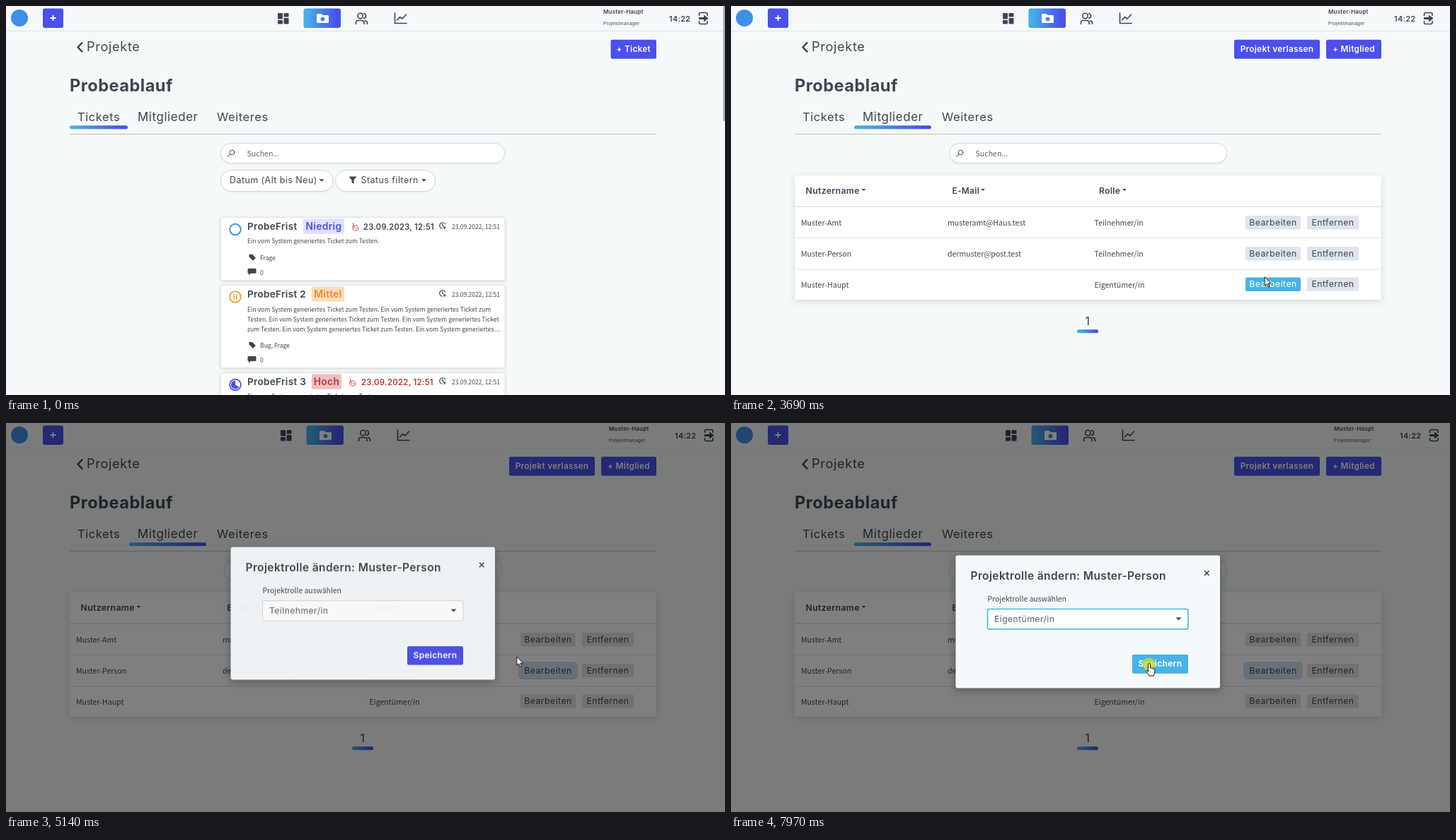
These frames come from a looping animation (1016 px wide and 551 px high, 8 s). An HTML page:

```html
<!DOCTYPE html>
<html lang="de">
<head>
<meta charset="utf-8">
<title>Projektrolle ändern</title>
<style>
html,body{margin:0;width:100%;height:100%;overflow:hidden;background:#f5f9fa}
svg{display:block;width:1016px;height:551px}
text{white-space:pre}
.m,.b{font-family:Inter,"Open Sans",sans-serif;font-weight:400;letter-spacing:.035em}
.b{font-weight:600;letter-spacing:.025em}
.h{font-weight:700;letter-spacing:.02em}
.s{font-family:"Noto Sans CJK JP","Noto Sans CJK SC","Noto Sans CJK",Lato,sans-serif}
.c{text-anchor:middle}
.card{fill:#fff;stroke:#dfe4e8;filter:drop-shadow(0 1px 2px #0002)}
.pill{fill:#fff;stroke:#cfd8dd;filter:drop-shadow(0 1px 1px #0001)}
.table{fill:#fff;filter:drop-shadow(0 2px 5px #0002)}
.box{filter:drop-shadow(0 3px 6px #0005)}
.line{fill:none;stroke:#3f4550;stroke-width:1.6;stroke-linecap:round;stroke-linejoin:round}
</style>
</head>
<body>
<svg id="stage" viewBox="0 0 1016 551" fill="#3f4550"></svg>
<script>
const LOOP = 8000, BLUE = '#4a50e8', SKY = '#47b3e8', GREY = '#dfe5eb';

// Keyframes written as [ms, css] stops
let css = '';
const keys = (name, stops) => {
  css += `@keyframes ${name}{${stops.map(([ms, rule]) => `${ms / LOOP * 100}%{${rule}}`).join('')}}`;
};
// Hidden at first, toggled at every edge
const toggle = (name, ...edges) =>
  keys(name, [[0, `opacity:${edges[0] ? 0 : 1}`], ...edges.filter(ms => ms).map(ms =>
    [ms, `opacity:${edges.indexOf(ms) % 2 ? 0 : 1}`])]);

toggle('tickets', 0, 1900);
toggle('tabHover', 1600);
toggle('status', 1820, 2480);
toggle('hover3', 3680, 4105);
toggle('hover2', 4105, 4880);
toggle('focus2', 4880);
toggle('selFocus', 5810);
toggle('selOpen', 5810, 6960);
toggle('list', 5910, 6960);
toggle('option2', 6190, 6960);
toggle('before', 0, 6960);
toggle('after', 6960);
toggle('saveHover', 7440);
toggle('arrow', 130, 1500, 2540, 5500, 7000, 7380);
toggle('hand', 1500, 2540, 5500, 7000, 7380);
toggle('click', 1820, 2000, 4710, 4890, 5810, 5980, 6825, 6970, 7965);
keys('members', [[0, 'opacity:0'], [1900, 'opacity:0'], [2150, 'opacity:1'], [LOOP, 'opacity:1']]);
keys('shiftMid', [[0, 'transform:none'], [4820, 'transform:translateX(4px)']]);
keys('shiftEnd', [[0, 'transform:none'], [4820, 'transform:translateX(8px)']]);
keys('dim', [[0, 'opacity:0'], [4820, 'opacity:0'], [4970, 'opacity:.5'], [LOOP, 'opacity:.5']]);
keys('fade', [[0, 'opacity:0'], [4968, 'opacity:0'], [5150, 'opacity:1'], [LOOP, 'opacity:1']]);
keys('drop', [[0, 'transform:translateY(-50px)'],
  [4968, 'transform:translateY(-50px);animation-timing-function:ease-out'],
  [5268, 'transform:none'], [LOOP, 'transform:none']]);
keys('move', [
  [0, 955, 522], [130, 955, 522], [330, 880, 490], [660, 540, 362], [930, 308, 276],
  [1200, 245, 210], [1500, 209, 164], [1650, 206, 159], [2470, 206, 159],
  [2820, 430, 232], [3170, 662, 304], [3500, 735, 362], [3800, 765, 396], [4040, 765, 391],
  [4320, 756, 350], [5000, 756, 350], [5140, 722, 331], [5490, 630, 300], [5780, 476, 280],
  [6000, 475, 281], [6300, 464, 323], [6430, 462, 327], [6950, 462, 327],
  [7250, 535, 337], [7560, 591, 341], [LOOP, 591, 341]
].map(([ms, x, y]) => [ms, `transform:translate(${x}px,${y}px)`]));

const anim = (name, body, ease = 'step-end') =>
  `<g style="animation:${name} ${LOOP}ms ${ease} infinite">${body}</g>`;
const text = (x, y, size, str, cls = 'm', fill = '') =>
  `<text x="${x}" y="${y}" font-size="${size}" class="${cls}"${fill && ` fill="${fill}"`}>${str}</text>`;
const rect = (x, y, w, h, r = 0, attrs = '') =>
  `<rect x="${x}" y="${y}" width="${w}" height="${h}" rx="${r}" ${attrs}/>`;
const fill = color => `fill="${color}"`;
const path = (d, attrs = '') => `<path d="${d}" ${attrs}/>`;
const line = (d, attrs = '') => path(d, `class="line" ${attrs}`);
const circle = (x, y, r, attrs = '') => `<circle cx="${x}" cy="${y}" r="${r}" ${attrs}/>`;
const caret = (x, y, s = 3.5) => path(`M${x - s} ${y - s / 2}h${2 * s}l${-s} ${s}z`);
const at = (x, y, body) => `<g transform="translate(${x} ${y})">${body}</g>`;
const bar = (x, y, w) => rect(x, y, w, 5, 2.5, fill('url(#grad)'));
const button = (x, y, w, h, label, color = BLUE, size = 11.8) =>
  rect(x, y, w, h, 2.5, fill(color)) + text(x + w / 2, y + h / 2 + 4.2, size, label, 'b c', '#fff');

const search = (x, w) => rect(x + .5, 194.5, w, 28, 14, 'class="pill"') +
  circle(x + 16.5, 207.5, 3.4, 'class="line" style="stroke-width:1"') +
  line(`M${x + 14} 210l-3.5 3.5`, 'style="stroke-width:1"') +
  text(x + 37.5, 212.7, 10.6, 'Suchen...', 's', '#5b626b');

const header = rect(0, 35, 1016, 1, 0, fill('#dfe4e7')) +
  circle(19, 17, 12, fill('#3f8fe6')) +
  rect(52, 3.5, 29, 27.5, 3, fill(BLUE)) + path('M62.5 17h8M66.5 13v8', 'stroke="#fff" stroke-width="1.8"') +
  anim('shiftMid',
    rect(384, 10, 7, 8.5, 1) + rect(392.5, 10, 7, 5.5, 1) + rect(384, 20, 7, 5.5, 1) + rect(392.5, 17, 7, 8.5, 1) +
    rect(420.5, 3.5, 52.5, 27.5, 3, fill('url(#grad)')) +
    path('M439 12.5q0-1.5 1.5-1.5h5l2 2h7q1.5 0 1.5 1.5v8q0 1.5-1.5 1.5h-14q-1.5 0-1.5-1.5z', fill('#fff')) +
    circle(447.5, 18.5, 3, fill('#4a8aea')) +
    circle(500.5, 14, 3.7, 'class="line"') +
    line('M494.5 25.5v-2q0-3 3-3h5.5q3 0 3 3v2M505.5 10.5q3 .5 3 3.5t-3 3.5M507.5 20.8q3 .6 3 3.2v1.5') +
    line('M549.5 10v14.5h16.5M552.5 20l4-4.5 3.5 2.5 5.5-6')) +
  anim('shiftEnd',
    text(844, 10.5, 8, 'Muster-Haupt', 'b') + text(844, 26.7, 6.5, 'Projektmanager') +
    text(937, 21.5, 10.9, '14:22', 'b') +
    line('M979.5 13.5v-2q0-2 2-2h7.5q2 0 2 2v2M979.5 21.5v2q0 2 2 2h7.5q2 0 2-2v-2') +
    path('M979 16h7v-3.5l6.5 5-6.5 5v-3.5h-7z'));

const title = line('M107.5 52l-6 6.3 6 6.3', 'style="stroke-width:2.4"') +
  text(114, 64.3, 18.2, 'Projekte') +
  text(90, 120.7, 23.6, 'Probeablauf', 'm h') +
  text(101, 162.7, 16.5, 'Tickets') + text(186, 162.7, 16.9, 'Mitglieder') + text(298, 162.7, 16.5, 'Weiteres') +
  rect(90, 181, 829, 1, 0, fill('#b9bfc4'));

const burn = (x, y, color) => at(x, y, line('M-3.5-5.5l1.5 7M-2-1q4-3 5.5 1.5t-2.5 4.5q-4 1-5-2.5M-3.5-2.5q-2 2-.5 5M0 1.5l2 1',
  `style="stroke:${color};stroke-width:1"`));
const started = y => at(617, y, line('M3.8-2a4.3 4.3 0 1 0-4.3 6.3M-.5-2.5v2.5h2', 'style="stroke-width:1.1"') +
  path('M.5.5l5 2.3-2.2.8-.8 2.2z'));
const meta = (y, tags) => path(`M343.5 ${y - 4.5}h4.5l5 5-4 4-5.5-5.5z`) + text(359, y + 3.7, 8.6, tags, 's') +
  path(`M343 ${y + 15.5}h9q1.5 0 1.5 1.5v4q0 1.5-1.5 1.5h-6l-3 2.5v-2.5q-1.5 0-1.5-1.5v-4q0-1.5 1.5-1.5z`) +
  text(359, y + 24.7, 8.6, '0', 's');
const ticket = (y, h, name, badge, [bx, bw, ink, tint]) => rect(303.5, y + .5, 401.5, h, 2, 'class="card"') +
  text(341, y + 17.7, 13.5, name, 'b') + rect(bx, y + 2.3, bw, 21.5, 2.5, fill(tint)) +
  text(bx + bw / 2, y + 17.7, 13.8, badge, 'b c', ink) + started(y + 12) +
  text(630, y + 16.8, 8.5, '23.09.2022, 12:51', 's');
const line1 = 'Ein vom System generiertes Ticket zum Testen.';

const tickets = button(854.5, 47.7, 64.5, 27, '+ Ticket') + bar(90, 169.3, 82) + search(303, 401) +
  rect(303.5, 232.5, 158.5, 30, 15, 'class="pill"') + text(316, 251.2, 12.5, 'Datum (Alt bis Neu)') + caret(446, 247) +
  rect(465.5, 232.5, 141, 30, 15, 'class="pill"') + path('M484.5 241.5h11l-4 5v5.5l-3-2v-3.5z') +
  text(501.5, 251.2, 12.5, 'Status filtern') + caret(590.5, 247) +
  ticket(299, 89, 'ProbeFrist', 'Niedrig', [420, 58, BLUE, '#dfe2fa']) +
  circle(324, 316.5, 7.8, 'fill="none" stroke="#3f9be0" stroke-width="2"') +
  burn(494, 313, '#cf4a45') + text(505, 316.7, 11.1, '23.09.2023, 12:51', 'b') +
  text(341, 336, 8.6, line1, 's') + meta(356.3, 'Frage') +
  ticket(395, 117, 'ProbeFrist 2', 'Mittel', [432, 46, '#f08a2e', '#ffdcbd']) +
  circle(324, 412, 7.8, 'fill="none" stroke="#f09a2e" stroke-width="1.8"') +
  path('M322.2 408.5v7M325.8 408.5v7', 'stroke="#f09a2e" stroke-width="1.6"') +
  text(341, 432.5, 8.6, line1 + ' Ein vom System generiertes Ticket zum', 's') +
  text(341, 446.7, 8.6, `Testen. ${line1} Ein vom System generiertes Ticket`, 's') +
  text(341, 460.8, 8.6, `zum Testen. ${line1} Ein vom System generiertes…`, 's') +
  meta(480.5, 'Bug, Frage') +
  ticket(519, 90, 'ProbeFrist 3', 'Hoch', [432, 42, '#b53a3a', '#eebfc0']) +
  circle(324, 536.5, 7.8, `fill="#fff" stroke="${BLUE}" stroke-width="1.8"`) +
  path('M324 536.5v-6a6 6 0 1 0 5.2 9z', fill(BLUE)) +
  burn(490, 533, '#cf4a45') + text(502, 536.7, 11.3, '23.09.2022, 12:51', 'b', '#b53a3a') +
  text(341, 556, 8.6, line1, 's') +
  rect(1013.5, 0, 2.5, 163, 1, fill('#a5a8aa'));

const chip = (x, y, w, label, back = GREY, ink = '') =>
  rect(x, y, w, 19.5, 2.5, fill(back)) + text(x + w / 2, y + 14, 12.3, label, 'm c', ink);
const edit = (y, back, ink) => chip(727, y, 78, 'Bearbeiten', back, ink);
const ring = (y, color) => rect(725.5, y - 1.5, 81, 22.5, 4, `fill="none" stroke="${color}" stroke-width="2"`);
const row = (y, name, mail, role) => text(99, y, 10.6, name, 's') + text(306, y, 10.6, mail, 's') +
  text(513.5, y, 10.6, role, 's') + edit(y - 14.3) + chip(814, y - 14.3, 73, 'Entfernen');

const members = button(711, 47.7, 121, 27, 'Projekt verlassen') + button(841, 47.7, 78, 27, '+ Mitglied') +
  search(308, 392) + rect(90, 240, 829, 176, 1, 'class="table"') +
  text(105.5, 265.7, 12.3, 'Nutzername', 'b') + caret(187.5, 260.5, 2.8) +
  text(312.5, 265.7, 11.9, 'E-Mail', 'b') + caret(356, 260.5, 2.8) +
  text(520, 265.7, 12.2, 'Rolle', 'b') + caret(556, 260.5, 2.8) +
  rect(90, 283.5, 829, 1.5, 0, fill('#dde2e6')) +
  [328, 372.5].map(y => rect(90, y, 829, 1, 0, fill('#dde2e6'))).join('') +
  row(311.3, 'Muster-Amt', 'musteramt@Haus.test', 'Teilnehmer/in') +
  row(355.3, 'Muster-Person', 'dermuster@post.test', 'Teilnehmer/in') +
  row(398.7, 'Muster-Haupt', '', 'Eigentümer/in') +
  anim('hover3', edit(384.4, SKY, '#fff')) +
  anim('hover2', ring(341, '#c4e6f8') + edit(341, SKY, '#fff')) +
  anim('focus2', ring(341, '#b9dcef') + edit(341, '#cfe1ec')) +
  text(504, 451.7, 16.5, '1', 'm c') + bar(489, 458.3, 30);

const select = (back, edge, w = 1) => rect(362.5, 263.5, 283.5, 28.5, 2.5, `fill="${back}" stroke="${edge}" stroke-width="${w}"`);
const picked = label => text(372, 281.7, 12.2, label, 'm', '#5b616a');
const option = (y, label, ink, back) => (back ? rect(363, y, 282.5, 19.2, 0, fill(back)) : '') +
  text(380.5, y + 13.7, 12.2, label, 'm', ink);

const modal = rect(317.5, 187.5, 373.5, 188, 3, 'fill="#f6f9fb" class="box"') +
  text(338.5, 221.7, 15.5, 'Projektrolle ändern: Muster-Person', 'b') +
  path('M669 209.5l6.5 6.5M675.5 209.5l-6.5 6.5', 'stroke="#3f4550" stroke-width="1.7"') +
  text(362.5, 253.2, 10.4, 'Projektrolle auswählen', 's') +
  select('#fff', '#d3d9de') + anim('selFocus', select('#fff', SKY, 1.6)) + anim('selOpen', select('#d9dfe6', SKY, 1.6)) +
  anim('before', picked('Teilnehmer/in')) + anim('after', picked('Eigentümer/in')) + caret(632.5, 277.5, 4) +
  button(567, 328, 79, 26.5, 'Speichern', BLUE, 12) +
  anim('saveHover', button(567, 328, 79, 26.5, 'Speichern', SKY, 12)) +
  anim('list', rect(362.5, 294, 283, 50.5, 1, 'fill="#fff" stroke="#d3d9de"') +
    option(300, 'Teilnehmer/in', '#fff', SKY) + option(319, 'Eigentümer/in') +
    anim('option2', option(319, 'Eigentümer/in', '#fff', SKY)));

const pointer = 'fill="#fff" stroke="#111" stroke-width="1" stroke-linejoin="round"';
const cursor = anim('click', circle(-.5, .7, 9, 'fill="#d2dc28" opacity=".78"')) +
  anim('arrow', path('M0 0v12.5l2.8-2.6 2 4.5 2-.9-2-4.3h3.9z', pointer)) +
  anim('hand', path('M-1.5 1.3a1.5 1.5 0 0 1 3 0v4.8q1.5-.8 2.2.4 1.5-.6 2.1.6 2-.3 2 1.3v3.6q0 2-1.3 3.7v1.5h-6.5q-.5-2.3-4-5.5-1-1.6.3-2 1-.1 2.2 1.4z', pointer));

const style = document.createElement('style');
style.textContent = css;
document.head.append(style);
document.getElementById('stage').innerHTML =
  `<defs><linearGradient id="grad"><stop offset=".1" stop-color="#48ade8"/><stop offset=".9" stop-color="${BLUE}"/></linearGradient></defs>` +
  rect(0, 0, 1016, 551, 0, fill('#f5f9fa')) + header + title +
  anim('tickets', tickets) + anim('tabHover', bar(174, 169.3, 109)) +
  anim('members', members, 'linear') +
  anim('status', rect(0, 548, 175, 3, 1, fill('#ebeff4'))) +
  anim('dim', rect(0, 0, 1016, 551, 0, fill('#000')), 'linear') +
  anim('fade', anim('drop', modal, 'linear'), 'linear') +
  anim('move', cursor, 'linear');
</script>
</body>
</html>
```
